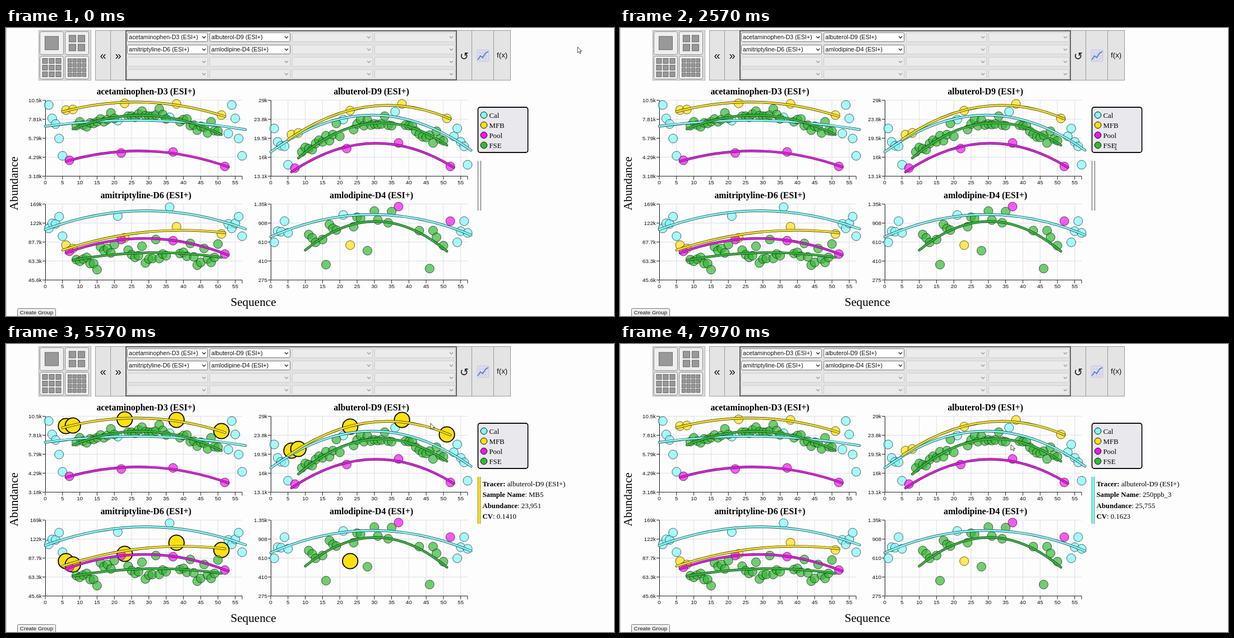
Animation, 1084 px wide and 516 px high, one loop 8000 ms. Source, as an HTML page:

```html
<!DOCTYPE html>
<html lang="en">
<head>
<meta charset="utf-8">
<title>Abundance by sequence</title>
<style>
html, body { margin: 0; width: 100%; height: 100%; overflow: hidden; background: #fdfdfd; }
svg { display: block; width: 1084px; height: 516px; }
text { font-family: "Liberation Sans", Arial, sans-serif; fill: #111; }
.serif { font-family: "Liberation Serif", Times, serif; fill: #000; }
.sym { font-family: "DejaVu Sans", sans-serif; }
</style>
</head>
<body>
<svg id="stage" viewBox="0 0 1084 516"></svg>
<script>
const LOOP = 8000;
const stage = document.getElementById('stage');

function el(tag, attrs, parent = stage) {
  const node = document.createElementNS('http://www.w3.org/2000/svg', tag);
  for (const key in attrs) node.setAttribute(key, attrs[key]);
  return parent.appendChild(node);
}
function text(x, y, size, content, attrs = {}, parent = stage) {
  const node = el('text', { x, y, 'font-size': size, ...attrs }, parent);
  node.textContent = content;
  return node;
}
const rect = (x, y, width, height, fill, stroke = 'none', rx = 0, sw = 1, parent = stage) =>
  el('rect', { x, y, width, height, fill, stroke, rx, 'stroke-width': sw }, parent);
const path = (d, stroke, width, attrs = {}, parent = stage) =>
  el('path', { d, fill: 'none', stroke, 'stroke-width': width, ...attrs }, parent);

const COLORS = { Cal: '#7ff9fb', MFB: '#ffdf0d', Pool: '#f512ee', FSE: '#33b833' };
const span = (from, to) => Array.from({ length: to - from + 1 }, (_, i) => from + i);
const SEQUENCE = {
  Cal: [1, 2, 3, 4, 5, 21, 36, 53, 54, 55, 56, 57],
  MFB: [6, 8, 23, 38, 51],
  Pool: [7, 22, 37, 52],
  FSE: [...span(9, 20), ...span(24, 35), ...span(39, 50)]
};
const MID_STANDARD = [3, 21, 36, 53];
const dots = [];

// ---- toolbar ----
function iconButton(x, y, count, size, gap) {
  rect(x + .5, y + .5, 42, 41, '#efefef', '#8a8a8a', 3);
  const side = count * size + (count - 1) * gap;
  for (let i = 0; i < count * count; i++) {
    rect(x + 21.5 - side / 2 + (i % count) * (size + gap),
      y + 21 - side / 2 + Math.floor(i / count) * (size + gap), size, size, '#999', '#555', 0, .8);
  }
}
function selectBox(x, y, label) {
  rect(x + .5, y + .5, 143, 16, label ? '#fff' : '#ebebeb', label ? '#777' : '#cfcfcf', 2);
  if (label) text(x + 3, y + 12, 10.67, label);
  path(`M${x + 134} ${y + 7}l3 3l3 -3`, label ? '#222' : '#999', 1.3);
}
function toolbar() {
  rect(0, 0, 1, 516, '#c4c4c4');
  rect(58.5, 4.5, 93, 89, '#dfdfdf', '#aaa');
  iconButton(60, 6, 1, 24, 0);
  iconButton(105, 6, 2, 12, 4);
  iconButton(60, 50, 3, 9, 3);
  iconButton(105, 50, 4, 6.5, 2);

  rect(159.5, 4.5, 740, 89, '#e4e4e4', '#999');
  for (const x of [186.5, 213.5, 830.5, 869.5]) path(`M${x} 5V93`, '#999', 1);
  rect(214, 5, 589, 88, '#e2e2e2', '#333', 0, 1.4);
  const labels = ['acetaminophen-D3 (ESI+)', 'albuterol-D9 (ESI+)', , , 'amitriptyline-D6 (ESI+)', 'amlodipine-D4 (ESI+)'];
  for (let i = 0; i < 16; i++) selectBox(216 + (i % 4) * 147, 8 + Math.floor(i / 4) * 22, labels[i]);

  const center = { 'text-anchor': 'middle' };
  text(173, 56, 20, '«', center);
  text(200, 56, 20, '»', center);
  text(817, 57, 19, '↺', { ...center, class: 'sym' });
  text(884.7, 53, 13.3, 'f(x)', center);
  rect(840, 39, 21, 21, '#dedcf0', '#c9c4e0', 2);
  path('M845 40V59M850 40V59M855 40V59M841 45H860M841 50H860M841 55H860', '#d9bfdc', .7);
  path('M841 57L846 50L850 53L855 45L860 42', '#3f88c8', 1.8);

  rect(20.5, 502.5, 68, 16, '#efefef', '#777', 2);
  text(54.5, 513, 9.8, 'Create Group', center);
}

// ---- charts ----
function chart(left, top, title, ticks, values, curves) {
  const px = n => left + n * 351 / 57;
  const bottom = top + 136;
  for (let n = 0; n <= 55; n += 5) {
    path(`M${px(n)} ${top}V${bottom}`, '#dedee8', 1);
    path(`M${px(n)} ${bottom}v6`, '#222', 1);
    text(px(n), bottom + 14, 9.8, n, { 'text-anchor': 'middle' });
  }
  ticks.forEach((label, i) => {
    const y = top + i * 34;
    path(`M${left} ${y}h351`, '#dedee8', 1);
    path(`M${left} ${y}h-5`, '#222', 1);
    text(left - 6, y + 3.5, 9.8, label, { 'text-anchor': 'end' });
  });
  path(`M${left + .5} ${top}V${bottom}H${left + 351}v6`, '#222', 1);
  text(left + 179.5, top - 10.5, 15.8, title, { 'text-anchor': 'middle', 'font-weight': 'bold', class: 'serif' });

  // The closing standards repeat the opening ones.
  const cal = values.Cal;
  values.Cal = [...cal, cal[0], cal[1], cal[3], cal[4]];
  for (const group in SEQUENCE) {
    SEQUENCE[group].forEach((n, i) => {
      const y = values[group][i];
      if (!y) return;
      const node = el('circle', { cx: px(n), cy: y, r: 8, fill: COLORS[group], stroke: '#000' });
      const key = group === 'Cal' && MID_STANDARD.includes(n) ? 'standard' : group;
      dots.push({ node, key });
    });
  }
  // Each trend is a parabola through its start, middle and end heights.
  for (const group in curves) {
    const [from, to, start, middle, end] = curves[group];
    const d = `M${px(from)} ${start}Q${px((from + to) / 2)} ${2 * middle - (start + end) / 2} ${px(to)} ${end}`;
    path(d, '#1d3030', 4.4, { 'stroke-linecap': 'round' });
    path(d, COLORS[group], 3, { 'stroke-linecap': 'round' });
  }
}

function charts() {
  chart(70, 129.5, 'acetaminophen-D3 (ESI+)', ['10.5k', '7.81k', '5.79k', '4.29k', '3.18k'], {
    Cal: [138, 162, 172, 198, 229, 166, 160, 189],
    MFB: [147, 146, 135, 136, 156],
    Pool: [237, 224, 222, 248],
    FSE: [175, 168, 174, 177, 170, 171, 168, 163, 168, 164, 152, 162,
      158, 158, 160, 154, 149, 157, 158, 158, 156, 145, 155, 163,
      168, 164, 163, 175, 174, 183, 176, 178, 188, 168, 184, 185]
  }, {
    Cal: [0, 58, 176, 165.5, 182], MFB: [5, 52, 150, 133, 158.5],
    Pool: [6, 53, 239, 220.5, 249], FSE: [8, 51, 181, 156.5, 191]
  });
  chart(472, 129.5, 'albuterol-D9 (ESI+)', ['29k', '23.8k', '19.5k', '16k', '13.1k'], {
    Cal: [180, 204, 211, 212, 245, 164, 150, 194],
    MFB: [191, 188, 148, 136, 162],
    Pool: [251, 216, 206, 248],
    FSE: [222, 214, 216, 218, 207, 201, 204, 193, 202, 191, 171, 194,
      182, 172, 164, 175, 165, 174, 172, 173, 172, 158, 174, 175,
      174, 175, 175, 185, 190, 195, 196, 192, 206, 185, 199, 202]
  }, {
    Cal: [0, 58, 222, 156, 219], MFB: [5, 52, 200, 140.5, 163],
    Pool: [6, 53, 258, 206.5, 250], FSE: [8, 51, 233, 170.5, 210]
  });
  chart(70, 315.5, 'amitriptyline-D6 (ESI+)', ['169k', '122k', '87.7k', '63.3k', '45.6k'], {
    Cal: [359, 350, 351, 338, 373, 337, 321, 351],
    MFB: [389, 395, 376, 356, 369],
    Pool: [400, 379, 381, 405],
    FSE: [415, 418, 414, 411, 422, 422, 433, 392, 399, 395, 403, 388,
      398, 406, 411, 408, 391, 421, 414, 413, 379, 413, 405, 408,
      404, 402, 409, 386, 410, 425, 420, 395, 414, 420, 411, 387]
  }, {
    Cal: [0, 58, 361, 327.5, 360], MFB: [5, 52, 398, 366, 367],
    Pool: [6, 53, 403, 377, 407], FSE: [8, 51, 416, 402.5, 411]
  });
  chart(472, 315.5, 'amlodipine-D4 (ESI+)', ['1.35k', '908', '610', '410', '275'], {
    Cal: [384, 364, 365, 346, 367, 335, 0, 0],
    MFB: [0, 0, 389, 0, 0],
    Pool: [0, 0, 320, 346],
    FSE: [0, 0, 370, 376, 384, 0, 379, 424, 352, 359, 362, 0,
      356, 339, 341, 0, 399, 0, 328, 344, 0, 0, 349, 329,
      0, 0, 0, 0, 363, 0, 0, 431, 363, 375, 0, 390]
  }, { Cal: [0, 58, 374, 334, 371], FSE: [10, 51, 398, 346.5, 400] });

  text(441, 498, 21.2, 'Sequence', { 'text-anchor': 'middle', class: 'serif' });
  text(0, 0, 21.2, 'Abundance', { 'text-anchor': 'middle', class: 'serif', transform: 'translate(21 278.5) rotate(-90)' });
}

// ---- legend and details ----
function legend() {
  rect(841.5, 142, 89, 81, '#e9e8ec', '#111', 4, 1.8);
  Object.keys(COLORS).forEach((name, i) => {
    el('circle', { cx: 852, cy: 156 + i * 18, r: 5.8, fill: COLORS[name], stroke: '#111' });
    text(861.5, 160.5 + i * 18, 12.8, name, { class: 'serif' });
  });
}
function details(color, rows) {
  const group = el('g', {});
  rect(841, 238, 5, 84, color, 'none', 0, 1, group);
  path('M841 238V322M846 238V322', '#555', .6, {}, group);
  rows.forEach(([label, value], i) => {
    const line = text(849.5, 255 + i * 19.3, 12.8, '', { class: 'serif' }, group);
    el('tspan', { 'font-weight': 'bold' }, line).textContent = label;
    el('tspan', {}, line).textContent = value;
  });
  return group;
}

toolbar();
charts();
legend();

const emptyDetails = path('M841.5 238V327M846.5 238V327', '#555', 1);
const rowsFor = (sample, abundance, cv) => [
  ['Tracer:', ' albuterol-D9 (ESI+)'], ['Sample Name', ': ' + sample],
  ['Abundance', ': ' + abundance], ['CV', ': ' + cv]
];
const blankDetails = details(COLORS.MFB, rowsFor('MB5', '23,951', '0.1410'));
const standardDetails = details(COLORS.Cal, rowsFor('250ppb_3', '25,755', '0.1623'));

const arrow = path('M0 0V10.5L2.5 8.2L4.3 12L6 11.2L4.3 7.6H7.4Z', '#333', .9, { fill: '#fff' });
const beam = path('M-2 -5H-.5L0 -4.5L.5 -5H2M0 -4.5V4.5M-2 5H-.5L0 4.5L.5 5H2', '#222', .9);

// ---- motion ----
const HOVER = { MFB: [3820, 5500], standard: [5840, 7560] };
const GROW = 300;
const pointer = [
  [0, 1019, 34], [150, 1019, 34], [800, 914, 112], [1370, 890, 145], [1750, 886, 168],
  [2250, 884, 213], [2750, 884, 213], [3300, 846, 192], [3800, 788, 160], [5420, 788, 160],
  [5570, 757, 142], [5850, 694, 149], [7480, 694, 149], [7800, 697, 180], [LOOP, 697, 180]
];
const clamp = v => Math.max(0, Math.min(1, v));
const cubic = v => v < .5 ? 4 * v ** 3 : 1 - 4 * (1 - v) ** 3;
const smooth = v => v * v * (3 - 2 * v);

function pointerAt(t) {
  const i = pointer.findIndex(p => p[0] > t);
  const [t0, x0, y0] = pointer[i - 1], [t1, x1, y1] = pointer[i];
  const k = smooth((t - t0) / (t1 - t0));
  return [x0 + (x1 - x0) * k, y0 + (y1 - y0) * k];
}
function hoverAt(key, t) {
  if (!HOVER[key]) return 0;
  const [enter, leave] = HOVER[key];
  return cubic(clamp((t - enter) / GROW)) - cubic(clamp((t - leave) / GROW));
}
const show = (node, visible) => node.setAttribute('visibility', visible ? 'visible' : 'hidden');

function draw(t) {
  for (const { node, key } of dots) {
    const h = hoverAt(key, t);
    node.setAttribute('r', 8 + 6 * h);
    node.setAttribute('fill-opacity', .7 + .3 * h);
    node.setAttribute('stroke-width', .8 + 1.1 * h);
    node.setAttribute('stroke-opacity', .75 + .25 * h);
  }
  show(emptyDetails, t < HOVER.MFB[0]);
  show(blankDetails, t >= HOVER.MFB[0] && t < HOVER.standard[0]);
  show(standardDetails, t >= HOVER.standard[0]);

  const [x, y] = pointerAt(t);
  const overText = t > 2100 && t < 2850;
  for (const node of [arrow, beam]) node.setAttribute('transform', `translate(${x} ${y})`);
  show(arrow, !overText);
  show(beam, overText);
}

const begin = performance.now();
function tick() {
  draw((performance.now() - begin) % LOOP);
  requestAnimationFrame(tick);
}
tick();
</script>
</body>
</html>
```
